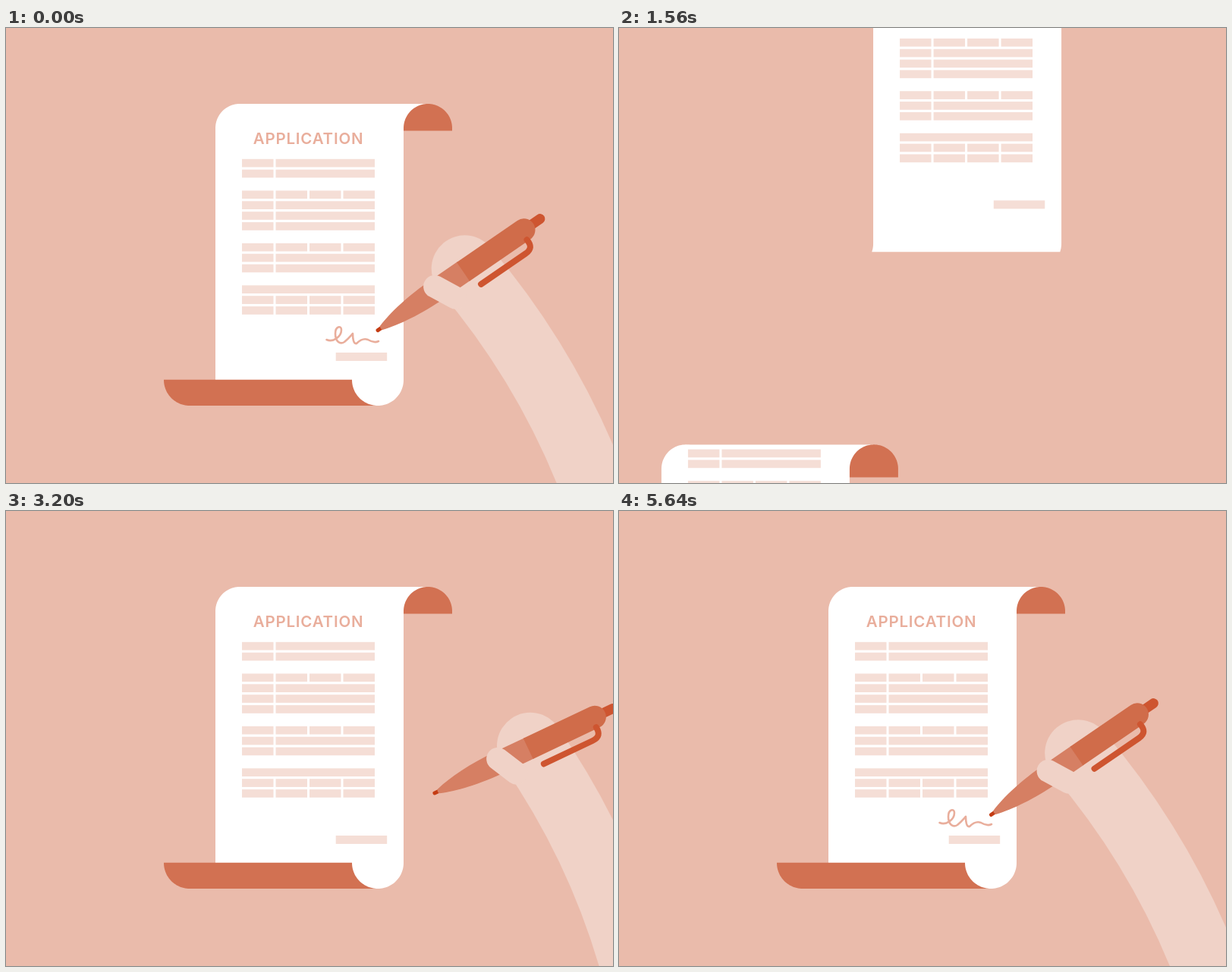
These frames come from a looping animation (800 px wide and 600 px high, 5.68 s). An HTML page with a canvas:

```html
<!DOCTYPE html>
<html lang="en">
<head>
<meta charset="utf-8">
<title>Signing an application</title>
<style>
  html, body { margin: 0; width: 100%; height: 100%; overflow: hidden; background: #eabbab; }
  canvas { display: block; }
</style>
</head>
<body>
<canvas id="stage" width="800" height="600"></canvas>
<script>
const ctx = document.getElementById('stage').getContext('2d');
const LOOP = 5680, PI = Math.PI, WIDTH = 248;
const C = { bg: '#eabbab', paper: '#fff', back: '#d27152', box: '#f5ded6', ink: '#e9ae9c',
            skin: '#f0d2c7', body: '#d06c4a', cone: '#d67f63', clip: '#ce5530', nib: '#c43c14' };

// Smooth monotone interpolation through rows of [time, ...values].
function key(t, rows) {
  const last = rows.length - 1;
  if (t <= rows[0][0]) return rows[0].slice(1);
  if (t >= rows[last][0]) return rows[last].slice(1);
  const i = rows.findIndex(r => r[0] > t) - 1;
  const rate = (k, c) => (rows[k + 1][c] - rows[k][c]) / (rows[k + 1][0] - rows[k][0]);
  const slope = (k, c) => {
    if (k === 0 || k === last) return 0;
    const a = rate(k - 1, c), b = rate(k, c);
    return a * b > 0 ? 2 * a * b / (a + b) : 0;
  };
  const a = rows[i], b = rows[i + 1], d = b[0] - a[0], p = (t - a[0]) / d, q = 1 - p;
  return a.slice(1).map((v, n) => {
    const c = n + 1;
    return q * q * (1 + 2 * p) * v + p * p * (3 - 2 * p) * b[c]
      + d * p * q * (q * slope(i, c) - p * slope(i + 1, c));
  });
}

// The paper runs along a wavy rail: down, round a bend, up, over a hump, and so on.
// Each bend turns to the left; dir 1 is a trough, dir -1 a crest.
const bends = [
  { s: -107.3, x: 656, y: 164, r: 34, dir: 1 },
  { s: 31.5, x: 588, y: 132, r: 32, dir: -1 },
  { s: 464, x: 524, y: 464, r: 34, dir: 1 },
  { s: 598.8, x: 456, y: 436, r: 32, dir: -1 }
];
const splits = [-1e4, ...bends.map(b => b.s + PI * b.r / 2), 1e4];

function rail(s) {
  const b = bends.filter(b => b.s <= s).pop();
  if (!b) return [656, 164 + s - bends[0].s];
  const u = s - b.s, arc = PI * b.r;
  return u < arc
    ? [b.x - b.r + b.r * Math.cos(u / b.r), b.y + b.dir * b.r * Math.sin(u / b.r)]
    : [b.x - 2 * b.r, b.y - b.dir * (u - arc)];
}

// Left edge and shift of the print on each white sheet.
const prints = [[408, 164 - bends[0].s], [276, 0], [144, 436 - 699.3]];

const sign = document.createElementNS('http://www.w3.org/2000/svg', 'path');
const signPath = 'M422.5 411C431 415 442 407 442 398C442 392 434 393 434 403C434 413 440 418 446 414' +
  'C452 409 455 405 457 403C457 410 458 417 462 416C467 411 472 409 477 411C482 414 487 415 491 413';
sign.setAttribute('d', signPath);
const signLength = sign.getTotalLength(), signShape = new Path2D(signPath);

// Print in the coordinates of the resting page.
function drawPrint(signed) {
  ctx.fillStyle = C.ink;
  ctx.font = '600 20.5px Inter, "Open Sans", sans-serif';
  ctx.letterSpacing = '0.8px';
  ctx.textAlign = 'center';
  ctx.textBaseline = 'alphabetic';
  ctx.fillText('APPLICATION', 398.5, 153);
  ctx.fillStyle = C.box;
  [...'22.4222.422.144'].forEach((kind, row) => {
    const y = 172.8 + row * 13.88;
    if (kind === '1') ctx.fillRect(311, y, 175, 10.7);
    if (kind === '2') {
      ctx.fillRect(311, y, 41.5, 10.7);
      ctx.fillRect(355.5, y, 130.5, 10.7);
    }
    if (kind === '4') for (let i = 0; i < 4; i++) ctx.fillRect(311 + i * 44.5, y, 41.5, 10.7);
  });
  ctx.fillRect(434.7, 428, 67.5, 11);
  if (signed > 0) {
    ctx.strokeStyle = C.ink;
    ctx.lineWidth = 2.6;
    ctx.lineCap = ctx.lineJoin = 'round';
    ctx.setLineDash([signLength * signed, 1e3]);
    ctx.stroke(signShape);
    ctx.setLineDash([]);
  }
}

function drawPage([dx, tail, heading, head], signed) {
  ctx.save();
  ctx.translate(dx, -1.65 * dx);
  for (let i = 0; i < 5; i++) {
    const from = Math.max(tail, splits[i]), to = Math.min(head, splits[i + 1]);
    if (from >= to) continue;
    const steps = Math.ceil((to - from) / 2), edge = [];
    for (let k = 0; k <= steps; k++) edge.push(rail(from + (to - from) * k / steps));
    ctx.save();
    ctx.beginPath();
    edge.forEach(([x, y]) => ctx.lineTo(x, y));
    edge.reverse().forEach(([x, y]) => ctx.lineTo(x - WIDTH, y));
    ctx.closePath();
    ctx.fillStyle = i % 2 ? C.back : C.paper;
    ctx.fill();
    if (i % 2 === 0) {
      const [left, shift] = prints[i / 2];
      ctx.clip();
      ctx.translate(left - 276, heading - 145 + shift);
      drawPrint(signed);
    }
    ctx.restore();
  }
  ctx.restore();
}

function stroke(path, color, width, cap = 'round') {
  ctx.strokeStyle = color;
  ctx.lineWidth = width;
  ctx.lineCap = cap;
  ctx.stroke(new Path2D(path));
}

function fill(path, color) {
  ctx.fillStyle = color;
  ctx.fill(new Path2D(path));
}

function drawHand([x, y, degrees]) {
  const a = degrees * PI / 180, cos = Math.cos(a), sin = Math.sin(a);
  const hx = x + 143 * cos - 2 * sin, hy = y - 143 * sin - 2 * cos;
  const ex = 731 + 0.63 * (hx - 538), ey = 600;
  const mx = (hx + ex) / 2 + 0.084 * (ey - hy), my = (hy + ey) / 2 - 0.084 * (ex - hx);
  stroke(`M${hx} ${hy}Q${mx} ${my} ${ex} ${ey}L${ex + (ex - mx) / 2} ${ey + (ey - my) / 2}`, C.skin, 88);

  // Pen along the x axis with its tip at the origin.
  ctx.save();
  ctx.translate(x, y);
  ctx.rotate(-a);
  stroke('M240 0H262', C.clip, 13);
  stroke('M2.5 0H10', C.nib, 5);
  fill('M8 -3C30 -10 60 -15 100 -15H140V15H100C60 15 30 10 8 3Q6 0 8 -3Z', C.cone);
  fill('M139 -15H236A15 15 0 0 1 236 15H139Z', C.body);
  stroke('M232 13C233 22 230 27 220 27H149', C.clip, 8);
  stroke('M97 -5L111 22.5', C.skin, 30);
  ctx.restore();
}

// Rows: time, drift, then rail positions of the tail, the heading and the head.
const leaving = [
  [640, 0, 28, 145, 571], [880, -6, 129, 161, 610], [1200, -39, 318, 358, 830],
  [1560, -88, 587, 645, 1075], [1740, -98, 722, 785, 1220]
];
const arriving = [
  [1080, -98, -990, -880, -540], [1560, -73, -570, -448, -97], [1840, -46, -343, -262, 108],
  [2080, -21, -137, -110, 285], [2400, -3, 0, 112, 537], [2640, 0, 28, 145, 571]
];

// Rows: time, pen tip x and y, angle.
const lift = [
  [0, 488, 400, 34.5], [400, 500, 369, 30], [880, 525, 348, 23.5],
  [1100, 590, 355, 20], [1300, 720, 375, 18], [1480, 870, 400, 18]
];
const approach = [
  [2600, 900, 350, 18], [2950, 685, 358, 21], [3200, 563, 373, 25.4], [3600, 477, 387, 33],
  [3900, 440, 400, 35], [4150, 424, 413, 36], [4320, 423.5, 414, 36.2]
];
const finish = [[5420, 492, 415, 34.5], [5640, 488.5, 402, 34.5], [5680, 488, 400, 34.5]];

function pen(t, signed) {
  if (t < 1600) return key(t, lift);
  if (t < 4340) return key(t, approach);
  if (t > 5420) return key(t, finish);
  const tip = sign.getPointAtLength(signLength * signed);
  return [tip.x + 1, tip.y + 2, 36.2 - 1.7 * signed];
}

function frame(now) {
  const t = (now - start) % LOOP;
  const [signed] = key(t, [[4340, 0], [4840, 0.42], [5420, 1]]);
  ctx.fillStyle = C.bg;
  ctx.fillRect(0, 0, 800, 600);
  if (t < 1740) drawPage(key(t, leaving), 1);
  if (t > 1080) drawPage(key(t, arriving), signed);
  drawHand(pen(t, signed));
  requestAnimationFrame(frame);
}

const start = performance.now();
frame(start);
</script>
</body>
</html>
```
